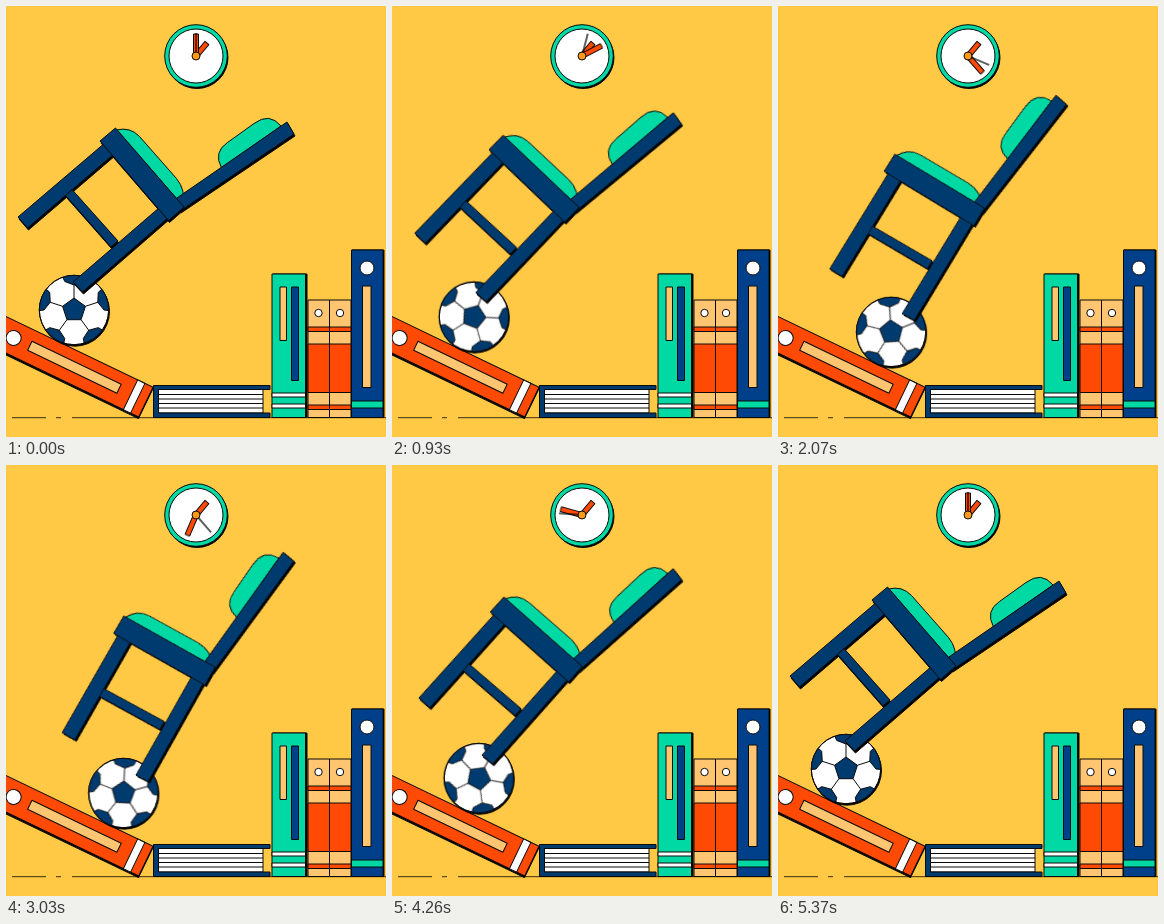
Write an HTML page that moves like this. It is 380x431 px and loops after 5.4 s.

```html
<!DOCTYPE html>
<html lang="en">
<head>
<meta charset="utf-8">
<title>Balancing chair</title>
<style>
  html, body { margin: 0; width: 100%; height: 100%; overflow: hidden; background: #ffc845; }
  svg { display: block; width: 380px; height: 431px; }
  .ink { stroke: #0a0a0a; stroke-width: 1; stroke-linejoin: round; }
  .navy { fill: #003b70; }
  .blue { fill: #00408a; }
  .green { fill: #00d9a3; }
  .red { fill: #ff4a05; }
  .peach { fill: #ffc570; }
  .white { fill: #fff; }
  .line { fill: none; }

  .tilt, .shift, .roll, .minute, .second { animation: 5400ms linear infinite; }
  .tilt { transform-origin: 150px 197px; animation-name: tilt; }
  .shift { animation-name: shift; }
  .roll { animation-name: roll; }
  .minute { animation-name: minute; }
  .second { animation-name: second; stroke-width: 1.3; }
  .tilt, .shift, .roll { animation-timing-function: cubic-bezier(.364, 0, .636, 1); }

  /* The cycle completes at 5370 ms and rests for the last 30 ms. */
  @keyframes tilt {
    0%, 99.444%, 100% { transform: translate(0, 0) rotate(0deg); }
    49.722% { transform: translate(32.6px, 11.3px) rotate(-20.6deg); }
  }
  @keyframes shift {
    0%, 99.444%, 100% { transform: translate(0, 0); }
    49.722% { transform: translate(51.5px, 25px); }
  }
  @keyframes roll {
    0%, 99.444%, 100% { transform: rotate(0deg); }
    49.722% { transform: rotate(78deg); }
  }
  @keyframes minute {
    0% { transform: rotate(0deg); }
    99.444%, 100% { transform: rotate(360deg); }
  }
  @keyframes second {
    0% { transform: rotate(0deg); }
    99.444%, 100% { transform: rotate(2160deg); }
  }
</style>
</head>
<body>
<svg viewBox="0 0 380 431">
  <defs>
    <g id="wood">
      <path d="M12 211 L100 136 L109 147 L21.500 222 Z"/>
      <path d="M59.500 189.500 L66 183.500 L112 235 L105 241 Z"/>
      <path d="M67 276 L154 201 L163 211 L76.500 286 Z"/>
      <path d="M281 116 L288 128 L174 205 L168 194 Z"/>
      <path d="M94 135 L109.500 122 L178 201 L162.500 214.500 Z"/>
    </g>
    <clipPath id="disc"><circle r="35"/></clipPath>
  </defs>

  <path d="M6 411.700 H40 M50 411.700 H55 M66 411.700 H380" stroke="#3d2d0b" stroke-width="1"/>

  <!-- clock -->
  <g class="ink" transform="translate(190 50)">
    <circle cx="1" cy="1.500" r="31"/>
    <circle class="green" r="31.300"/>
    <circle class="white" r="27"/>
    <rect class="red" x="-2.500" y="-17" width="5" height="17" transform="rotate(40)"/>
    <rect class="red minute" x="-2.500" y="-22" width="5" height="22"/>
    <path class="second" d="M0 0 V-23"/>
    <circle r="4" fill="#ff9a16"/>
  </g>

  <!-- leaning book -->
  <g class="ink" transform="translate(147 381.300) rotate(25.700)">
    <rect x="-190" y="1" width="190.500" height="33.500"/>
    <rect class="red" x="-190" width="190" height="33"/>
    <rect class="white" x="-17" width="8" height="33"/>
    <rect class="peach" x="-129" y="11" width="99" height="10"/>
    <circle class="white" cx="-147" cy="16" r="7.500"/>
  </g>

  <!-- lying book -->
  <g class="ink">
    <rect class="white" x="152" y="383.500" width="105" height="23.500"/>
    <path class="line" d="M153 388.500 H257 M153 393 H257 M153 397.500 H257 M153 402 H257"/>
    <path class="navy" d="M147.500 379.500 H264 V383.500 H152.500 V407 H264 V411.500 H147.500 Z"/>
  </g>

  <!-- standing books -->
  <g class="ink">
    <rect x="267" y="268" width="34" height="143.500"/>
    <rect class="green" x="266" y="268" width="33.500" height="143.500"/>
    <rect class="peach" x="274" y="281" width="6.500" height="53.500"/>
    <rect class="blue" x="285.500" y="281" width="7" height="93.500"/>
    <rect class="white" x="266" y="387" width="33.500" height="4"/>
    <rect class="white" x="266" y="398" width="33.500" height="4"/>
  </g>
  <g class="ink">
    <g id="twin">
      <rect class="peach" x="302" y="294" width="21.500" height="117.500"/>
      <rect class="red" x="302" y="321" width="21.500" height="4.500"/>
      <rect class="red" x="302" y="338" width="21.500" height="48.500"/>
      <rect class="red" x="302" y="399" width="21.500" height="4.500"/>
      <circle class="white" cx="312.500" cy="307" r="3.700"/>
    </g>
    <use href="#twin" x="21.500"/>
  </g>
  <g class="ink">
    <rect x="346" y="244" width="32" height="167.500"/>
    <rect class="blue" x="345.500" y="244" width="31.500" height="167.500"/>
    <circle class="white" cx="361" cy="262" r="7"/>
    <rect class="peach" x="356.500" y="280" width="8.500" height="101.500"/>
    <rect class="green" x="345.500" y="395" width="31.500" height="7"/>
  </g>

  <!-- ball -->
  <g class="ink" transform="translate(68 304)">
    <g class="shift">
      <circle cx=".8" cy="1.500" r="34.700"/>
      <circle class="white" r="34.700"/>
      <g clip-path="url(#disc)"><g class="roll">
        <path id="seams" class="line"/>
        <path id="patches" class="navy"/>
      </g></g>
      <circle class="line" r="34.700"/>
    </g>
  </g>

  <!-- chair -->
  <g class="ink tilt">
    <use href="#wood" x="1" y="2"/>
    <path class="green" d="M110.500 124 Q124 120.500 133.500 130.500 L170.500 172.500 Q180 184 177 200 Z"/>
    <path class="green" d="M215.500 162 Q207 146 221.500 136.500 L248 117.500 Q263.500 106 275 120 Z"/>
    <use class="navy" href="#wood"/>
  </g>
</svg>
<script>
  const point = (r, deg) => {
    const a = deg * Math.PI / 180;
    return `${(r * Math.cos(a)).toFixed(2)} ${(r * Math.sin(a)).toFixed(2)}`;
  };
  const polygon = points => `M${points.join('L')}Z`;

  const spokes = [0, 1, 2, 3, 4].map(i => i * 72 - 90);
  const seams = spokes.map(a => `M${point(12, a)}L${point(26, a)}`);
  // Rim patches are cut off by the ball's edge.
  const rim = spokes.map(a => polygon([
    point(25, a), point(30, a + 18), point(36, a + 19),
    point(40, a), point(36, a - 19), point(30, a - 18)
  ]));

  document.getElementById('seams').setAttribute('d', seams.join(''));
  document.getElementById('patches').setAttribute('d',
    polygon(spokes.map(a => point(12, a))) + rim.join(''));
</script>
</body>
</html>
```
